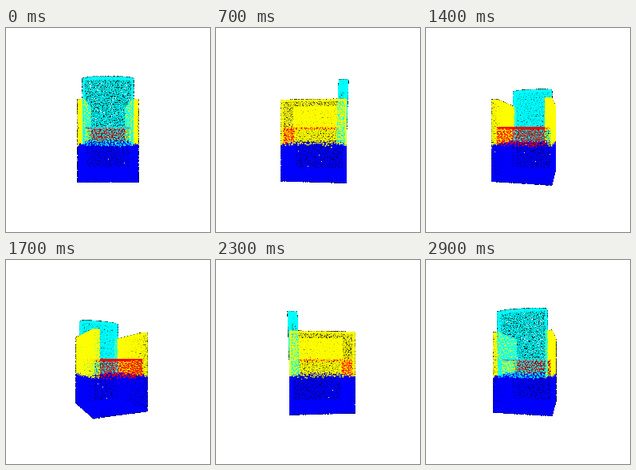
Write a matplotlib script that moves like this. It is 256x256 px and loops after 3 s.

```python
import numpy as np
import matplotlib.pyplot as plt
from matplotlib.animation import FuncAnimation

SIZE = 256
FRAMES = 30
FOCAL = 221.7        # 60 degree field of view
DISTANCE = 260
RADIUS = 1.28        # splat radius in pixels
STEP = 2.3           # spacing of the surface samples

CYAN, YELLOW, BLUE, RED = (0, 1, 1), (1, 1, 0), (0, 0, 1), (1, 0, 0)

# Chair measures: x to the side, y up, z towards the rear
OUT, INNER, BACK_W = 37.5, 30.5, 31
FRONT, REAR = -43.5, 38.5
FLOOR, SPLIT, SEAT, ARM, TOP = -65, -19, 3, 38, 65.5
ARCH = 1.7           # drop of the backrest's top corners

rng = np.random.default_rng(7)
points, colors = [], []


def patch(origin, u, v, color):
    """Sample a parallelogram on a staggered, jittered grid."""
    origin, u, v = (np.array(a, float) for a in (origin, u, v))
    nu, nv = (max(2, round(np.linalg.norm(a) / STEP) + 1) for a in (u, v))
    s, t = np.meshgrid(np.linspace(0, 1, nu), np.linspace(0, 1, nv))
    stagger = np.where(np.arange(nv) % 2, 0.25, -0.25)[:, None]
    s = np.clip(s + (stagger + rng.uniform(-0.35, 0.35, s.shape)) / (nu - 1), 0, 1)
    t = np.clip(t + rng.uniform(-0.35, 0.35, t.shape) / (nv - 1), 0, 1)
    xyz = origin + s.reshape(-1, 1) * u + t.reshape(-1, 1) * v
    rgb = np.tile(np.array(color, float), (len(xyz), 1))
    # everything under the ragged split line belongs to the base
    rgb[xyz[:, 1] < SPLIT + rng.normal(0, 1.3, len(xyz))] = BLUE
    if color == CYAN:
        height = np.clip(xyz[:, 1] / TOP, 0, 1)
        xyz[:, 1] -= ARCH * height * (xyz[:, 0] / BACK_W) ** 4
    points.append(xyz)
    colors.append(rgb)


def build_chair():
    depth = (0, 0, REAR - FRONT)
    wall = (0, ARM - FLOOR, 0)
    for side in (-1, 1):
        thick = (side * (OUT - INNER), 0, 0)
        patch((side * OUT, FLOOR, FRONT), depth, wall, YELLOW)
        patch((side * INNER, SEAT, FRONT), depth, (0, ARM - SEAT, 0), YELLOW)
        patch((side * INNER, ARM, FRONT), depth, thick, YELLOW)
        patch((side * INNER, FLOOR, FRONT), thick, wall, YELLOW)
        patch((side * INNER, FLOOR, REAR), thick, wall, YELLOW)
        patch((side * BACK_W, SPLIT, 28), (0, 0, 10.5), (0, TOP - SPLIT, 3), CYAN)

    width = (2 * INNER, 0, 0)
    patch((-INNER, FLOOR, FRONT), width, (0, SEAT - FLOOR, 0), RED)
    patch((-INNER, SEAT, FRONT), width, (0, 0, 28 - FRONT), RED)
    patch((-INNER, FLOOR, REAR), width, (0, SPLIT - FLOOR, 0), CYAN)
    patch((-OUT, FLOOR, FRONT), (2 * OUT, 0, 0), depth, BLUE)

    back = (2 * BACK_W, 0, 0)
    patch((-BACK_W, SPLIT, REAR), back, (0, TOP - SPLIT, 3), CYAN)
    patch((-BACK_W, SEAT, 28.5), back, (0, TOP - SEAT, 2.5), CYAN)
    patch((-BACK_W, TOP, 31), back, (0, 0, 10.5), CYAN)


build_chair()
points = np.concatenate(points)
colors = np.concatenate(colors)


def render(angle):
    """Blend soft splats front to back; untouched pixels stay white."""
    c, s = np.cos(angle), np.sin(angle)
    x, y, z = points.T
    dist = DISTANCE - (z * c - x * s)
    px = SIZE / 2 + FOCAL * (x * c + z * s) / dist
    py = SIZE / 2 - FOCAL * y / dist

    offset = np.arange(-2, 3)
    dx, dy = (a.ravel() for a in np.meshgrid(offset, offset))
    col = np.floor(px).astype(int)[:, None] + dx
    row = np.floor(py).astype(int)[:, None] + dy
    gap = (col + 0.5 - px[:, None]) ** 2 + (row + 0.5 - py[:, None]) ** 2
    weight = 1 - gap / RADIUS ** 2
    who, which = np.nonzero(weight > 0)
    cell = row[who, which] * SIZE + col[who, which]
    weight = np.minimum(weight[who, which], 0.999)

    order = np.lexsort((dist[who], cell))
    who, cell, weight = who[order], cell[order], weight[order]
    fade = np.log1p(-weight)
    before = np.cumsum(fade) - fade
    hit, first, group = np.unique(cell, return_index=True, return_inverse=True)
    weight = weight * np.exp(before - before[first][group])

    image = np.ones((SIZE * SIZE, 3))
    for k in range(3):
        total = np.bincount(cell, weight * colors[who, k], SIZE * SIZE)
        image[hit, k] = total[hit]
    return np.clip(image, 0, 1).reshape(SIZE, SIZE, 3)


fig = plt.figure(figsize=(2.56, 2.56), dpi=100, facecolor="white")
ax = fig.add_axes([0, 0, 1, 1])
ax.axis("off")
view = ax.imshow(render(0), interpolation="nearest", aspect="auto")


def update(i):
    view.set_data(render(2 * np.pi * i / FRAMES))
    return [view]


anim = FuncAnimation(fig, update, frames=FRAMES, interval=100, repeat=True)
plt.show()
```
